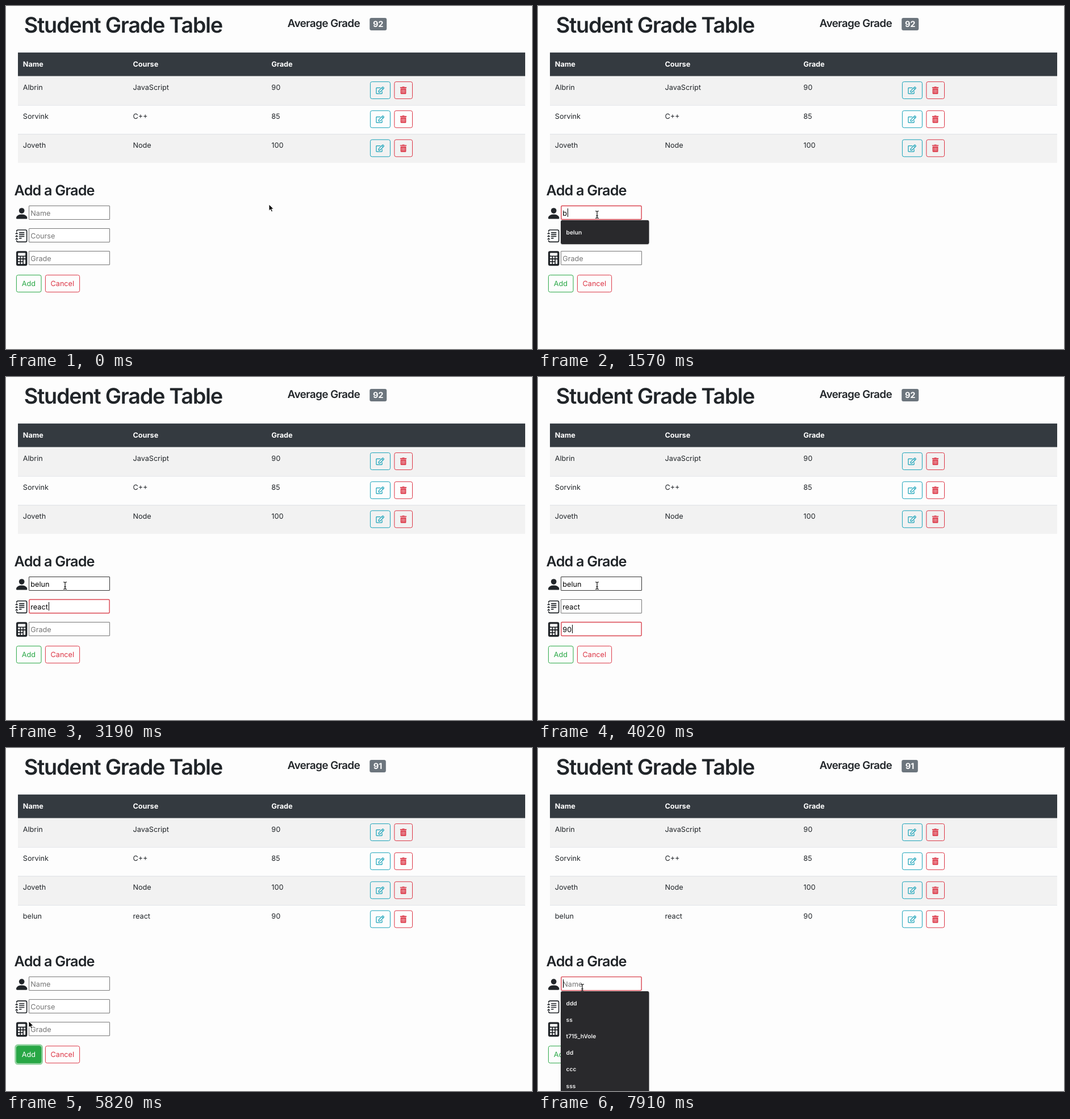
An HTML page for the animation above (8000 ms loop, 926 by 605 pixels).

```html
<!DOCTYPE html>
<html lang="en">
<head>
<meta charset="utf-8">
<title>Student Grade Table</title>
<style>
  html, body { margin: 0; width: 100%; height: 100%; overflow: hidden; background: #fdfdfd; }
  svg { display: block; width: 100vw; height: 100vh; }
  text {
    font: 440 12.65px Inter, "Liberation Sans", sans-serif;
    font-optical-sizing: none;
    text-rendering: geometricPrecision;
    fill: #212529;
  }
  .h1, .h2, .h4 { font-weight: 560; letter-spacing: -.033em; }
  .h1 { font-size: 37.8px; }
  .h2 { font-size: 25.2px; }
  .h4 { font-size: 18.9px; }
  .th { font-weight: 700; fill: #fff; }
  .badge { font-size: 14.5px; font-weight: 700; fill: #fff; text-anchor: middle; }
  .mid { text-anchor: middle; }
  .item { font-size: 10.2px; font-weight: 600; fill: #f4f4f4; }
  .red { fill: #dc3545; }
</style>
</head>
<body>
<svg id="stage" viewBox="0 0 926 605" preserveAspectRatio="none"></svg>
<script>
const LOOP = 8000, ROW = 51.1, FIELD = 39.8, ITEM = 29.2;
const GREEN = '#28a745', RED = '#dc3545', TEAL = '#17a2b8', INK = '#212529';

const rows = [
  ['Albrin', 'JavaScript', 90],
  ['Sorvink', 'C++', 85],
  ['Joveth', 'Node', 100],
  ['belun', 'react', 90]
];
const words = rows[3].map(String);
const hints = ['Name', 'Course', 'Grade'];
const recent = ['ddd', 'ss', 't715_hVole', 'dd', 'ccc', 'sss'];

// time, focused field, typed letters, menu (1 match, 2 recent), caret start
const steps = [
  [0, -1, 0, 0],
  [730, 0, 0, 0, 740], [760, 0, 0, 2, 740],
  [1570, 0, 1, 1], [1650, 0, 2, 1], [1830, 0, 3, 1], [1880, 0, 4, 1], [1925, 0, 5, 1], [1970, 0, 5, 0],
  [2210, 1, 0, 0],
  [2540, 1, 1, 1], [2690, 1, 2, 1], [2930, 1, 3, 1], [3110, 1, 4, 1], [3190, 1, 5, 0],
  [3520, 2, 0, 0],
  [3940, 2, 1, 1], [3980, 2, 2, 1], [4020, 2, 2, 0, 4030],
  [5450, 3, 0, 0], [5580, -1, 0, 0],
  [6910, 0, 0, 0], [6950, 0, 0, 2, 6910]
];
const ADDED = 5820;

// time, x, y of the pointer's hot spot
const track = [
  [150, 463, 350], [715, 104, 368],
  [4680, 104, 368], [5040, 40, 482],
  [5830, 40, 482], [6090, 67, 397],
  [6262, 67, 397], [6270, 69, 410], [6420, 74, 432],
  [6630, 74, 432], [6910, 78, 423]
];

const icons = {
  edit: 'M402.3 344.9l32-32c5-5 13.7-1.5 13.7 5.7V464c0 26.5-21.5 48-48 48H48c-26.5 0-48-21.5-48-48V112c0-26.5 21.5-48 48-48h273.5c7.1 0 10.7 8.6 5.7 13.7l-32 32c-1.5 1.5-3.5 2.3-5.7 2.3H48v352h352V350.5c0-2.1.8-4.1 2.3-5.6zm156.6-201.8L296.3 405.7l-90.4 10c-26.2 2.9-48.5-19.2-45.6-45.6l10-90.4L432.9 17.1c22.9-22.9 59.9-22.9 82.7 0l43.2 43.2c22.9 22.9 22.9 60 .1 82.8zM460.1 174L402 115.9 216.2 301.8l-7.3 65.3 65.3-7.3zM524.9 94.3l-43.2-43.2c-4.1-4.1-10.8-4.1-14.8 0L436 82l58.1 58.1 30.9-30.9c4-4.2 4-10.8-.1-14.9z',
  trash: 'M32 464a48 48 0 0 0 48 48h288a48 48 0 0 0 48-48V128H32zM304 208a16 16 0 0 1 32 0v224a16 16 0 0 1-32 0zm-96 0a16 16 0 0 1 32 0v224a16 16 0 0 1-32 0zm-96 0a16 16 0 0 1 32 0v224a16 16 0 0 1-32 0zM432 32H312l-9.4-18.7A24 24 0 0 0 281.1 0H166.8a24 24 0 0 0-21.4 13.3L136 32H16A16 16 0 0 0 0 48v32a16 16 0 0 0 16 16h416a16 16 0 0 0 16-16V48a16 16 0 0 0-16-16z'
};

const text = (x, y, s, cls = '', extra = '') => `<text x="${x}" y="${y}" class="${cls}" ${extra}>${s}</text>`;
const rect = (x, y, w, h, extra) => `<rect x="${x}" y="${y}" width="${w}" height="${h}" ${extra}/>`;
const group = (id, body, extra = '') => `<g id="${id}" ${extra}>${body}</g>`;
const outline = (x, y, w, color, extra = '') =>
  rect(x, y, w, 30, `rx="3" fill="none" stroke="${color}" ${extra}`);
const icon = (x, y, name, color) =>
  `<path transform="translate(${x} ${y}) scale(.0254)" fill="${color}" fill-rule="evenodd" d="${icons[name]}"/>`;
const place = (x, y, scale, body) => `<g transform="translate(${x} ${y}) scale(${scale})">${body}</g>`;

function tableRow([name, course, grade], i) {
  const y = 123.4 + i * ROW;
  return group('row' + i,
    (i % 2 ? '' : rect(21, y, 893, ROW, 'fill="#f2f2f2"')) +
    (i ? rect(21, y + .1, 893, 1, 'fill="#dee2e6"') : '') +
    text(29.8, y + 24.5, name) + text(223.5, y + 24.5, course) + text(467.3, y + 24.5, grade) +
    outline(641.4, y + 10.2, 35, TEAL) + icon(651.3, y + 18.8, 'edit', TEAL) +
    outline(683.8, y + 10.2, 31.7, RED) + icon(693.8, y + 18.8, 'trash', RED));
}

function fieldIcons() {
  const person = `<circle cx="8" cy="5" r="3"/><path d="M3 14s-1 0-1-1 1-4 6-4 6 3 6 4-1 1-1 1z"/>`;
  const rungs = [5.5, 8.5, 11.5].map(y => `M1.5 ${y}h2M2.5 ${y - 1}v1`).join('');
  const lines = [4.5, 6.5, 8.5, 10.5].map((y, i) => `M5.5 ${y}h${i === 3 ? 2 : 5}`).join('');
  const journal = `<path fill="none" stroke="${INK}" stroke-linecap="round"
    d="M2.5 3A1.5 1.5 0 0 1 4 1.5h8A1.5 1.5 0 0 1 13.5 3v10a1.5 1.5 0 0 1-1.5 1.5H4A1.5 1.5 0 0 1 2.5 13${rungs}${lines}"/>`;
  const key = (x, y, w, h) => rect(x, y, w, h, 'rx=".5" fill="#fdfdfd"');
  let calc = rect(2, 0, 12, 16, 'rx="2"') + key(4, 2, 8, 3) + key(10, 6, 2, 2) + key(10, 9, 2, 5);
  for (const x of [4, 7]) for (const y of [6, 9, 12]) calc += key(x, y, 2, 2);
  return [person, journal, calc]
    .map((body, i) => place(14.7, 352.9 + i * 39.7, 1.622, `<g fill="${INK}">${body}</g>`)).join('');
}

function field(i) {
  const y = Math.round(352 + i * FIELD);
  return rect(40.5, y + .5, 142, 24, `id="box${i}" fill="#fff"`) +
    text(43.3, y + 17.6, '', '', `id="value${i}"`);
}

const form =
  text(14.6, 333.8, 'Add a Grade', 'h2') + fieldIcons() + [0, 1, 2].map(field).join('') +
  rect(44, 0, 1, 15, 'id="caret" fill="#000"') +
  rect(16.6, 472.8, 47.1, 33.6, `id="ring" rx="4.4" fill="none" stroke="${GREEN}" stroke-width="2.6"`) +
  outline(18.4, 474.6, 43.6, GREEN, 'id="add"') + text(39.8, 494.4, 'Add', 'mid', 'id="addText"') +
  outline(69.4, 474.6, 60.2, RED) + text(99.3, 494.4, 'Cancel', 'mid red') +
  group('menu',
    rect(40, 1.2, 155.5, 0, 'id="shade" rx="3" fill="#000" opacity=".2"') +
    rect(40, 0, 155.5, 0, 'id="panel" rx="3" fill="#29292c"') +
    recent.map((_, i) => text(49.6, 24.8 + i * ITEM, '', 'item', `id="item${i}"`)).join(''));

const beam = 'M-3-6.3c1.8 0 3 .3 3 1.5V4.8c0 1.2-1.2 1.5-3 1.5M3-6.3c-1.8 0-3 .3-3 1.5M0 4.8c0 1.2 1.2 1.5 3 1.5M-1.8 2h3.6';
const pointer =
  `<path id="arrow" fill="#000" stroke="#fff" stroke-width=".9" d="M0 0V11.2l2.6-2.4 1.8 4.2 2-.9-1.8-4.1H8.1z"/>` +
  `<g id="beam" fill="none"><path d="${beam}" stroke="#fff" stroke-width="2" opacity=".5"/><path d="${beam}" stroke="#000" stroke-width="1.1"/></g>` +
  `<path id="hand" fill="#fff" stroke="#000" stroke-width=".9" stroke-linejoin="round"
    d="M-1.2.2c0-1.6 2.4-1.6 2.4 0V5l.4-.1c.2-1 2-.9 2 .2.4-.7 1.9-.4 1.9.6.5-.5 1.6-.1 1.6.8v3c0 1.5-.8 2-1 3.5H-.6C-1 11.4-3.6 9-4.2 7.4c-.5-1.3 1-2 1.8-.9L-1.2 8z"/>`;

document.getElementById('stage').innerHTML =
  rect(0, 0, 926, 605, 'fill="#fdfdfd"') +
  text(31.7, 47, 'Student Grade Table', 'h1') +
  text(495.6, 36.7, 'Average Grade', 'h4') +
  rect(640.2, 21, 30, 22, 'id="badge" rx="3.2" fill="#6c757d"') + text(655, 37, '', 'badge', 'id="average"') +
  rows.map(tableRow).join('') +
  rect(21, 82, 893, 41.6, 'fill="#343a40"') + rect(21, 82, 893, .8, 'fill="#454d55"') +
  text(29.8, 107.3, 'Name', 'th') + text(223.5, 107.3, 'Course', 'th') + text(467.3, 107.3, 'Grade', 'th') +
  group('form', form) + group('pointer', pointer);

const $ = id => document.getElementById(id);
const set = (id, attrs) => { for (const k in attrs) $(id).setAttribute(k, attrs[k]); };
const show = (id, on) => set(id, { visibility: on ? 'visible' : 'hidden' });
const clamp = v => Math.min(1, Math.max(0, v));
const ease = v => v * v * (3 - 2 * v);
const ramp = (t, start, length = 150) => ease(clamp((t - start) / length));
const mix = (a, b, p) => a + (b - a) * p;

function pointerAt(t) {
  const next = track.findIndex(k => k[0] > t);
  if (next === 0) return track[0].slice(1);
  if (next < 0) return track[track.length - 1].slice(1);
  const [t0, x0, y0] = track[next - 1], [t1, x1, y1] = track[next];
  const p = ease((t - t0) / (t1 - t0));
  const lift = next === 1 ? 12 * Math.sin(Math.PI * p) : 0;
  return [mix(x0, x1, p), mix(y0, y1, p) - lift];
}

function drawFields(t, hovered) {
  const [start, focus, typed, menu, caretStart = start] = steps.filter(s => s[0] <= t).pop();
  for (let i = 0; i < 3; i++) {
    const value = i < focus ? words[i] : i === focus ? words[i].slice(0, typed) : '';
    const on = i === focus;
    $('value' + i).textContent = value || hints[i];
    $('value' + i).style.fill = value ? '#000' : '#757575';
    set('box' + i, {
      x: on ? 40.9 : 40.5, width: on ? 141.2 : 142, rx: on ? 1.5 : .5,
      stroke: on ? '#d9444f' : i === hovered ? '#333' : '#767676', 'stroke-width': on ? 1.4 : 1
    });
  }

  const active = focus >= 0 && focus < 3;
  const lit = Math.floor(Math.max(0, t - caretStart) / 500) % 2 === 0;
  show('caret', active && lit);
  show('menu', active && menu > 0);
  if (!active) return;
  const width = typed ? $('value' + focus).getComputedTextLength() : 0;
  set('caret', { x: 44 + Math.round(width), y: Math.round(357 + focus * FIELD) });

  const list = menu === 2 ? recent : [words[focus]];
  const height = 13 + list.length * ITEM;
  set('menu', { transform: `translate(0 ${377.8 + focus * FIELD})` });
  set('panel', { height });
  set('shade', { height });
  recent.forEach((_, i) => { $('item' + i).textContent = menu ? list[i] || '' : ''; });
}

function drawAdd(t) {
  const fill = ramp(t, 4984) * (1 - ramp(t, ADDED));
  const ring = ramp(t, 5450) * (1 - ramp(t, 6890));
  set('add', { fill: GREEN, 'fill-opacity': fill });
  set('ring', { 'stroke-opacity': ring / 2 });
  $('addText').style.fill = `rgb(${mix(40, 255, fill)}, ${mix(167, 255, fill)}, ${mix(69, 255, fill)})`;
}

function draw(t) {
  const added = t >= ADDED, shift = added ? ROW : 0;
  show('row3', added);
  $('average').textContent = added ? 91 : 92;
  set('badge', { width: added ? 28.6 : 30 });
  set('average', { x: added ? 654.5 : 655.2 });
  set('form', { transform: `translate(0 ${shift})` });

  const [x, y] = pointerAt(t), formY = y - shift;
  const hovered = x < 40 || x > 183 ? -1 :
    [0, 1, 2].findIndex(i => formY >= 352 + i * FIELD && formY <= 377 + i * FIELD);
  const onAdd = x > 18 && x < 62 && formY > 474 && formY < 505;
  set('pointer', { transform: `translate(${x} ${y})` });
  show('beam', hovered >= 0);
  show('hand', onAdd);
  show('arrow', hovered < 0 && !onAdd);

  drawFields(t, hovered);
  drawAdd(t);
}

const begin = performance.now();
function tick() {
  draw((performance.now() - begin) % LOOP);
  requestAnimationFrame(tick);
}
tick();
</script>
</body>
</html>
```
